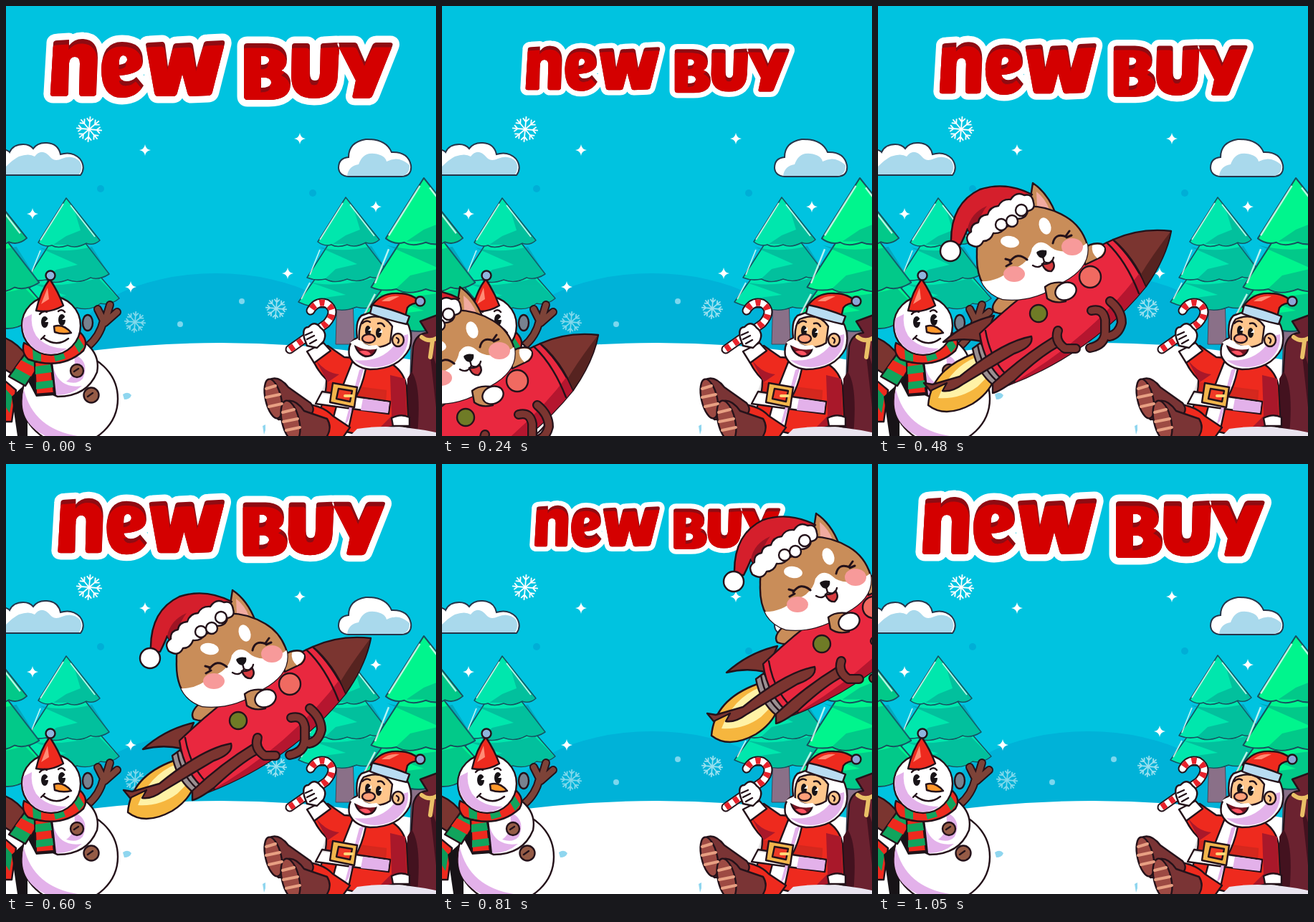
Write an HTML page that moves like this. It is 600 by 600 pixels and loops after 1080 ms.

```html
<!DOCTYPE html>
<html lang="en">
<head>
<meta charset="utf-8">
<title>New buy</title>
<style>
html, body { margin: 0; height: 100%; overflow: hidden; background: #00c3e0; }
svg { display: block; width: 100vw; height: 100vh; }
.o { stroke: #24121a; stroke-width: 2.4; stroke-linejoin: round; stroke-linecap: round; }
.l { fill: none; stroke: #24121a; stroke-width: 2.4; stroke-linecap: round; stroke-linejoin: round; }
.red { fill: #ee2a1e; } .wh { fill: #fff; } .lilac { fill: #e3b1ea; } .brown { fill: #7b3530; }
</style>
</head>
<body>
<svg viewBox="0 0 600 600">
<defs>
  <g id="tree">
    <path fill="#8a7088" stroke="#3d4a5c" d="M-12 140H10L12 205H-14Z"/>
    <g fill="currentColor" stroke="#17505f" stroke-width="1.5" stroke-linejoin="round">
      <path d="M0 55L74 140Q62 150 48 147Q34 158 15 153Q-5 161-22 154Q-45 156-66 146Z"/>
      <path d="M0 28L60 106Q46 115 34 111Q18 120 2 114Q-16 121-28 114Q-42 117-54 112Z"/>
      <path d="M0 0L47 59Q38 67 28 63Q14 71 2 66Q-12 71-20 66Q-30 69-39 62Z"/>
    </g>
    <g fill="#087d83" opacity=".36">
      <path d="M-54 117Q-20 128 45 112L73 140Q62 149 48 146Q34 157 15 152Q-5 160-22 153L-45 153L-30 140L0 136Z"/>
      <path d="M-38 69Q-5 78 36 68L60 106Q46 114 34 110Q18 119 2 113Q-16 120-28 113L-14 100L16 93Z"/>
      <path d="M10 12L46 59Q38 66 28 62Q14 70 2 65L-18 65L0 53L20 45Z"/>
    </g>
    <path fill="none" stroke="#e6fff8" stroke-width="1.8" opacity=".8" d="M-4 8L-36 59M-36 73L-50 108M-50 119L-62 142M6 10L40 54"/>
  </g>
  <path id="star" fill="#fff" d="M0-8Q1-1 8 0Q1 1 0 8Q-1 1-8 0Q-1-1 0-8Z"/>
  <path id="word" fill-rule="evenodd" clip-rule="evenodd" d="
    M66 52Q66 48 72 48L88 47V55Q96 45 108 46Q128 47 128 72L126 122Q126 126 120 126H106Q102 126 102 121L103 80Q103 71 96 71Q89 71 88 80L87 122Q87 126 82 126H66Q61 126 62 121Z
    M162 50Q192 50 191 78Q190 95 158 97Q160 105 168 105Q176 105 182 99L192 111Q182 128 162 128Q133 128 133 88Q134 50 162 50ZM158 82Q170 80 169 74Q168 69 163 69Q157 70 158 82Z
    M195 54Q195 51 200 51L218 50Q221 50 222 54L226 85L233 56Q234 52 238 52L256 51Q260 51 261 55L266 86L276 52Q277 49 281 49L302 48Q306 48 305 53L288 120Q287 125 282 125L258 126Q254 126 253 121L246 95L239 121Q238 126 233 126H212Q208 126 207 121Z
    M332 56Q332 52 337 52H365Q392 53 392 74Q392 86 384 90Q398 95 397 110Q396 131 366 131H337Q332 131 332 126ZM356 70H362Q368 72 367 77Q365 82 356 82ZM356 100H363Q371 102 370 108Q368 114 356 114Z
    M399 56Q399 52 403 52H420Q424 52 424 56V94Q424 104 431 104Q438 104 438 94L439 56Q439 52 443 52L461 51Q465 51 465 55L463 98Q461 129 430 129Q398 129 398 98Z
    M463 55Q461 51 466 51H486Q490 51 491 55L501 78L511 55Q513 51 517 51H536Q541 51 539 56L512 124Q510 129 505 129H487Q482 129 484 123L488 104Z"/>
  <clipPath id="inWord"><use href="#word"/></clipPath>
  <clipPath id="inBody"><path id="bodyShape" d="M428 255Q336 296 242 386Q248 432 282 458Q400 412 474 320Q455 280 428 255Z"/></clipPath>
  <clipPath id="inHead"><path id="headShape" d="M238 275Q236 226 285 212Q325 201 362 223Q384 236 392 262Q397 293 358 314Q318 343 274 338Q236 326 238 275Z"/></clipPath>
</defs>

<rect width="600" height="600" fill="#00c3e0"/>
<ellipse cx="293" cy="480" rx="200" ry="107" fill="#00b2d8"/>
<path class="wh" d="M0 500Q300 440 600 500V600H0Z"/>
<g id="sky"></g>
<g stroke="#26354a" stroke-width="2">
  <path class="wh" d="M-9 202Q1 199 5 204Q10 193 24 193Q33 193 38 199Q44 190 57 191Q73 192 76 207Q92 202 103 213Q112 225 104 236H-9Z"/>
  <path class="wh" d="M478 238H552Q567 237 565 222Q561 203 538 204Q530 185 502 186Q478 190 478 211Q464 212 464 226Q465 237 478 238Z"/>
</g>
<g fill="#a9d9ec">
  <path d="M0 224Q10 214 18 210Q32 205 40 210Q50 197 62 211Q68 218 78 213Q93 207 103 217Q108 226 102 235H0Z"/>
  <path d="M476 237Q478 223 492 221Q498 204 514 206Q529 208 531 217Q548 208 563 222Q564 235 552 237Z"/>
</g>
<g id="trees"></g>
<path fill="#8fd6ef" d="M163 542Q170 537 175 543Q173 549 165 549ZM358 586L362 584V592L360 598Z"/>

<g id="snowman">
  <path class="o brown" d="M-5 462Q15 468 32 492L20 520L-5 505Z"/>
  <path class="o red" d="M-5 520L14 536L8 580H-5Z"/>
  <path fill="#0c9b5a" d="M0 535L9 545L5 568L0 560Z"/>
  <path fill="#171317" d="M8 545L30 525V600H16Z"/>
  <path class="l" stroke-width="14" style="stroke-width:12" d="M114 475Q131 461 136 439M136 439L128 423M138 440L145 417M138 442L155 427"/>
  <path class="l" style="stroke:#7d4338;stroke-width:8" d="M114 475Q131 461 136 439M136 439L128 423M138 440L145 417M138 442L155 427"/>
  <ellipse class="o" cx="114" cy="442" rx="7" ry="11" fill="#78828f"/>
  <ellipse class="o wh" cx="89" cy="548" rx="67" ry="64"/>
  <path class="lilac" d="M25 535Q38 590 100 600H55Q14 580 25 535Z"/>
  <path class="o wh" d="M38 485Q75 468 108 468Q132 485 127 511Q113 545 72 545Q45 535 38 485Z"/>
  <path class="lilac" d="M65 500Q72 535 106 530Q90 544 68 543Z"/>
  <path class="lilac" d="M94 485Q118 496 107 520Q99 529 84 524Q101 512 94 485Z"/>
  <path fill="#171317" d="M36 490L64 486L70 543L42 545L30 522Z"/>
  <path class="o" fill="#11a45d" d="M26 486L50 494L27 530L4 517Z"/>
  <path class="red" d="M21 494L42 505L35 517L13 505Z"/>
  <path class="o red" d="M40 497L62 493L67 540L42 542Z"/>
  <path fill="#11a45d" d="M41 503L62 500L64 511L41 514ZM42 525L65 522L66 532L42 535Z"/>
  <path class="o red" d="M25 470Q65 492 104 456Q116 468 108 481Q77 509 31 493Q21 484 25 470Z"/>
  <path fill="#11a45d" d="M37 477L49 480L49 496L38 494ZM65 480L77 476L83 492L69 496ZM92 467L100 461L109 475L102 484Z"/>
  <circle class="o wh" cx="63" cy="446" r="41"/>
  <path class="lilac" d="M24 436Q20 463 42 480Q64 492 85 478Q56 478 42 460Q34 447 36 430Z"/>
  <path class="o red" d="M61 381Q73 399 80 418Q62 429 42 425Q48 398 61 381Z"/>
  <path fill="#ff8b75" d="M58 393L60 409L49 416Z"/>
  <circle class="o" cx="62" cy="376" r="6.5" fill="#8fb5dd"/>
  <g fill="#171317"><ellipse cx="54" cy="441" rx="5" ry="8"/><ellipse cx="78" cy="438" rx="5" ry="8"/></g>
  <path class="wh" d="M54 441l6-6v6ZM78 438l6-6v6Z"/>
  <path class="l" d="M47 430q5-6 10-3M73 426q5-4 9 1M52 463Q70 477 87 464M49 465l5-5"/>
  <path class="o" fill="#ff982b" d="M67 447Q80 443 91 456Q79 459 68 455Z"/>
  <circle class="o" cx="99" cy="509" r="9" fill="#955b46"/>
  <circle class="o" cx="119" cy="543" r="10.5" fill="#955b46"/>
  <path class="l" stroke-width="2" d="M95 510l6-4M114 545l7-5"/>
</g>

<g id="santa">
  <path class="o" fill="#6b2230" d="M568 475Q572 457 588 456L578 440L605 430V600H560Z"/>
  <path fill="#43121f" d="M566 510Q580 530 574 598L560 600V520ZM590 470L600 500V560Z"/>
  <path class="l" style="stroke:#eac067;stroke-width:6" d="M580 462Q590 470 602 463M595 468L592 490"/>
  <path class="l" style="stroke-width:13" d="M396 479L447 443Q463 425 447 415Q433 411 425 425"/>
  <path class="l" style="stroke:#fff;stroke-width:9" d="M396 479L447 443Q463 425 447 415Q433 411 425 425"/>
  <path class="l" style="stroke:#e8222b;stroke-width:9;stroke-dasharray:7 7;stroke-linecap:butt" d="M396 479L447 443Q463 425 447 415Q433 411 425 425"/>
  <path class="o red" d="M425 486L449 474L472 490L500 492Q550 490 559 530L562 590L500 600L428 583Q448 550 447 521Q433 508 425 486Z"/>
  <path fill="#a9182a" d="M536 515L538 572L520 590L560 592L557 520ZM430 490Q444 512 465 514L449 525Z"/>
  <path class="o wh" d="M483 497L503 500Q499 527 487 548L478 590L455 581L466 540Z"/>
  <path class="o wh" d="M441 538L536 552L534 569L432 555Z"/>
  <path class="lilac" d="M498 548L535 553L533 568L495 564ZM493 508L500 504L489 540L478 578L472 586Z"/>
  <path class="o" fill="#2a1b23" d="M446 526L530 537L529 551L441 540Z" opacity=".12"/>
  <path class="o" fill="#f2b64c" d="M456 526L490 532L486 560L452 553Z"/>
  <path class="o" fill="#ee3a26" d="M464 534L483 537L480 552L461 548Z"/>
  <path class="l" style="stroke:#ffd878;stroke-width:4" d="M483 544H473"/>
  <path class="o wh" d="M420 482L443 470L453 481L430 498Z"/>
  <path class="o wh" d="M416 463Q413 448 422 448Q431 438 439 449Q449 456 443 468L434 477L420 474Z"/>
  <path class="l" stroke-width="2" d="M418 459l9-4M420 465l10-5M424 471l9-5"/>
  <path class="o red" d="M408 555Q440 555 456 572L480 588L470 602H400Z"/>
  <path class="o" fill="#7a3435" d="M366 522Q380 514 394 532L425 554Q434 565 421 574L380 577Q355 552 366 522Z"/>
  <path class="o" fill="#7a3435" d="M387 553Q402 545 416 565L448 576Q457 590 444 606H400Q376 575 387 553Z"/>
  <ellipse class="o" cx="373" cy="548" rx="11" ry="28" transform="rotate(-13 373 548)" fill="#9d4a43"/>
  <ellipse class="o" cx="397" cy="579" rx="12" ry="29" transform="rotate(-13 397 579)" fill="#9d4a43"/>
  <path class="l" style="stroke:#e8a083;stroke-width:4" d="M363 534L376 530M363 546L382 542M367 559L385 555M386 567L402 563M387 580L407 576M391 592L410 588"/>
  <path class="o wh" d="M538 575Q551 568 563 574V586L540 586ZM528 590Q550 582 566 590V604H524Z"/>
  <path fill="#e9e4ef" d="M490 590Q540 582 600 595V600H480Z"/>

  <path class="o wh" d="M496 432Q487 440 490 463Q476 469 479 488Q486 505 508 507Q548 507 563 478Q571 453 552 430L530 420Z"/>
  <path class="lilac" d="M486 494Q530 499 550 461L561 458Q563 485 538 499Q508 511 486 494Z"/>
  <path class="o" fill="#ffc68c" d="M499 437Q525 426 539 447L536 470Q517 483 493 468Q491 447 499 437Z"/>
  <ellipse class="o" cx="547" cy="466" rx="8" ry="9" fill="#ffc68c"/>
  <path class="l" stroke-width="2" d="M545 463q5 2 2 7"/>
  <g fill="#171317"><ellipse cx="505" cy="453" rx="4" ry="7"/><ellipse cx="520" cy="456" rx="4" ry="7"/></g>
  <path class="wh" d="M505 453l5-5v5ZM520 456l5-5v5Z"/>
  <path class="l" d="M497 443q6-6 11-2M519 443q6-2 9 4"/>
  <ellipse class="o" cx="506" cy="464" rx="9" ry="6" fill="#ff9f79"/>
  <path class="o" fill="#751320" d="M486 468Q499 477 517 477Q514 490 501 489Q488 484 486 468Z"/>
  <path fill="#ff5362" d="M493 482Q505 479 509 486Q502 490 493 482Z"/>
  <path class="wh" d="M480 470Q488 462 497 468Q503 476 517 473L522 477Q505 483 490 475Z"/>
  <path class="o red" d="M509 420Q523 399 548 401Q567 401 579 414Q565 414 560 421L557 434Z"/>
  <path fill="#ff8a72" d="M524 412Q535 403 549 405L535 412Z"/>
  <path class="o" fill="#b9dcf2" d="M511 417Q539 423 563 433L559 444Q532 438 508 429Z"/>
  <circle class="o" cx="578" cy="412" r="6.5" fill="#8da6d6"/>
</g>

<g id="title" role="img" aria-label="new BUY">
  <use href="#word" fill="#fff" stroke="#fff" stroke-width="19" stroke-linejoin="round"/>
  <use href="#word" fill="#8e0b12"/>
  <g clip-path="url(#inWord)"><use href="#word" y="7" x="-1" fill="#d40000" stroke="#d40000"/></g>
</g>

<g id="rocket">
  <path class="o" fill="#f6b63e" d="M234 414Q174 436 170 486Q194 505 232 484Q254 470 262 450Z"/>
  <path fill="#fff2a6" d="M237 419Q200 434 184 476Q215 478 239 460L252 447Z"/>
  <path class="o" fill="#9a8f91" d="M243 399L232 407Q238 440 261 458L277 451Z"/>
  <path class="l" d="M239 402Q245 436 269 455"/>
  <path class="o brown" d="M262 361Q222 370 191 398Q218 391 245 397L254 380Z"/>
  <path class="o" fill="#c98d59" d="M268 336Q256 348 262 356Q278 362 305 352L330 330Z"/>
  <use href="#bodyShape" class="o" fill="#e9283f"/>
  <g clip-path="url(#inBody)">
    <path fill="#b5162f" d="M268 466Q392 400 470 295L500 320L380 460Z"/>
    <path class="l" d="M250 382Q258 430 292 455"/>
  </g>
  <path class="o brown" d="M428 255Q466 238 509 243Q502 280 474 320Q457 280 428 255Z"/>
  <path fill="#562320" d="M508 244Q482 278 467 303L474 319Q501 282 508 244Z"/>
  <path class="l" d="M419 259Q446 284 464 330"/>
  <path class="o brown" d="M314 390Q274 397 214 446L176 457L164 455L173 466L196 455L190 466Q203 468 218 457L290 414Q318 404 314 390Z"/>
  <path class="o brown" d="M346 390Q300 418 260 456L260 469Q268 468 290 452Q326 418 352 404Z"/>
  <g id="claws"></g>
  <circle class="o" cx="396" cy="307" r="15" fill="#f06a61"/>
  <circle class="o" cx="324" cy="358" r="12" fill="#6f7b26"/>

  <path class="o" fill="#c98d59" d="M386 268Q399 258 412 261Q422 269 412 279L389 290Z"/>
  <path class="wh" d="M399 263Q412 260 416 267Q416 275 406 281Q397 273 399 263Z"/>
  <path class="o" fill="#c98d59" d="M309 222L316 176Q337 190 348 219Z"/>
  <path fill="#f1aaa0" d="M322 210L321 188Q334 198 339 213Z"/>
  <use href="#headShape" class="o" fill="#c98d59"/>
  <g clip-path="url(#inHead)">
    <path class="wh" d="M232 312Q263 318 287 296Q311 289 315 267Q324 253 338 263Q350 275 372 270Q386 266 398 254V350H232Z"/>
    <g fill="#f79a9a"><ellipse cx="290" cy="303" rx="15" ry="11"/><ellipse cx="371" cy="265" rx="15" ry="12"/></g>
  </g>
  <g class="wh">
    <ellipse cx="284" cy="258" rx="13" ry="8" transform="rotate(8 284 258)"/>
    <ellipse cx="333" cy="236" rx="8" ry="12" transform="rotate(-20 333 236)"/>
  </g>
  <path class="l" style="stroke-width:3" d="M284 286Q294 271 308 283M285 284l-7-2M286 288l-7 4M344 260Q347 245 363 251M362 250l5-7M363 252l7-3"/>
  <path class="o" fill="#d83b3f" d="M329 289Q339 290 343 284Q349 293 342 299Q333 300 329 289Z"/>
  <path class="l" d="M330 279L332 286Q326 297 316 291M332 286Q342 291 345 280"/>
  <path fill="#171317" d="M321 273Q325 268 335 270Q337 277 330 281Q323 280 321 273Z"/>
  <path class="o" fill="#c98d59" d="M333 321Q342 313 358 315L362 341Q346 345 336 337Z"/>
  <ellipse class="o wh" cx="362" cy="327" rx="15" ry="12" transform="rotate(-22 362 327)"/>

  <path class="o" fill="#d51f2c" d="M202 262Q200 205 242 185Q278 173 315 192L238 263L225 240Q222 248 215 262Z"/>
  <path fill="#9e1424" d="M225 240Q229 218 252 208Q235 230 238 260Z"/>
  <path class="o wh" d="M227 261Q220 250 230 244Q229 233 240 231Q241 221 253 220Q256 209 268 208Q273 198 285 199Q293 187 304 193Q315 190 317 203Q320 213 309 215Q307 226 294 226Q291 236 278 237Q273 247 261 246Q257 257 247 257Q241 270 227 261Z"/>
  <circle class="o wh" cx="201" cy="271" r="14"/>
  <g class="o wh"><circle cx="272" cy="234" r="8"/><circle cx="287" cy="229" r="8"/><circle cx="300" cy="214" r="8"/></g>
</g>
</svg>
<script>
const $ = id => document.getElementById(id);

const flake = (x, y, r, alpha) => {
  let arms = '';
  for (let a = 0; a < 360; a += 45)
    arms += `<path transform="rotate(${a + 5})" d="M0 0V${-r}M${-r * .25} ${-r * .85}L0 ${-r * .58}L${r * .25} ${-r * .85}"/>`;
  return `<g transform="translate(${x} ${y})" fill="none" stroke="#fff" stroke-width="1.8" opacity="${alpha}">${arms}</g>`;
};
const dot = (x, y, r, color) => `<circle cx="${x}" cy="${y}" r="${r}" fill="${color}"/>`;
const star = ([x, y]) => `<use href="#star" x="${x}" y="${y}"/>`;
const tree = (x, y, size, color) =>
  `<use href="#tree" transform="translate(${x} ${y}) scale(${size})" color="${color}"/>`;

$('sky').innerHTML =
  flake(116, 172, 18, 1) + flake(180, 441, 15, .5) + flake(377, 422, 15, .6) +
  dot(132, 255, 5, '#00aed6') + dot(428, 261, 5, '#00aed6') +
  dot(243, 444, 4, '#7cd7ee') + dot(329, 412, 4, '#7cd7ee') +
  [[194, 201], [410, 185], [37, 290], [516, 280], [174, 392], [393, 373]].map(star).join('');
$('trees').innerHTML =
  tree(84, 268, 1, '#00e7ad') + tree(474, 267, 1, '#00e7ad') +
  tree(-33, 246, 1.32, '#00f58d') + tree(583, 240, 1.36, '#00f58d');

// Curled metal legs: a dark line under a thinner brown one.
const claws = 'M398 354Q414 350 417 367V385Q416 402 396 406M424 341Q440 354 440 371Q436 387 423 390M351 382Q346 397 361 407L376 407';
$('claws').innerHTML = [['#24121a', 14], ['#7b3530', 9.5]].map(([color, width]) =>
  `<path d="${claws}" fill="none" stroke="${color}" stroke-width="${width}" stroke-linecap="round" stroke-linejoin="round"/>`).join('');

const LOOP = 1080, STEP = 30, PULSE = 525;
// Rows of time, x, y of the rocket's round window.
const flight = [[0, -157, 722], [240, 33, 574], [360, 128, 500], [480, 224, 429], [600, 324, 358], [810, 530, 251], [1080, 795, 113]];
// Rows of time, half width of the title.
const pulse = [[0, 248.5], [75, 237.5], [240, 191.5], [285, 178.5], [360, 192.5], [480, 223.5], [525, 248.5]];

function at(keys, t) {
  const i = keys.findIndex(k => k[0] > t), a = keys[i - 1], b = keys[i];
  const u = (t - a[0]) / (b[0] - a[0]);
  return a.slice(1).map((v, j) => v + (b[j + 1] - v) * u);
}

function draw() {
  const t = Math.floor(performance.now() % LOOP / STEP) * STEP;
  const [x, y] = at(flight, t);
  const scale = at(pulse, t % PULSE)[0] / 248.5;
  $('rocket').setAttribute('transform', `translate(${x - 324} ${y - 358})`);
  $('title').setAttribute('transform', `translate(300.5 88) scale(${scale}) translate(-300.5 -88)`);
  requestAnimationFrame(draw);
}
draw();
</script>
</body>
</html>
```
